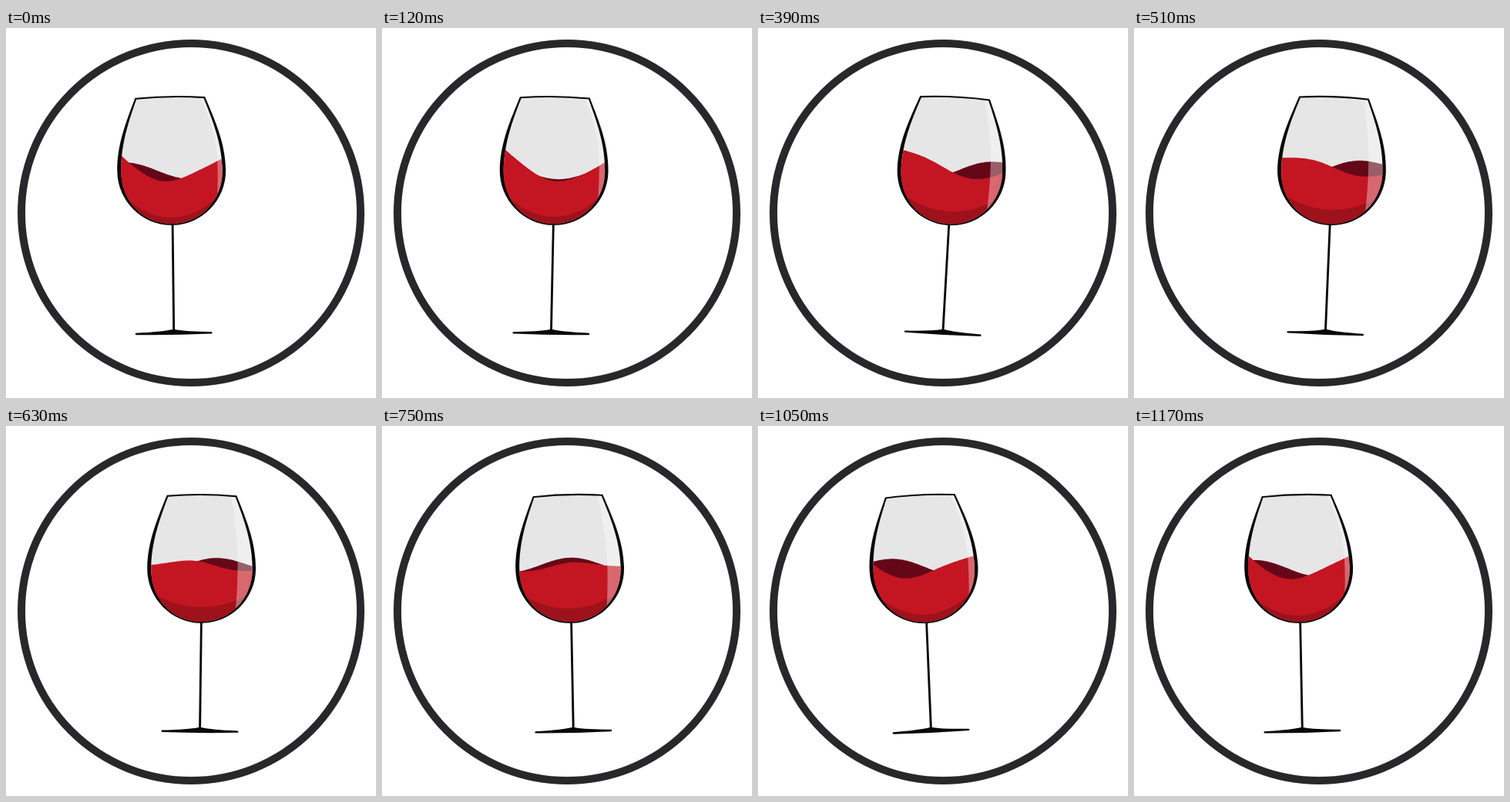
Write an HTML page with a canvas that moves like this. It is 480 px wide and 480 px high and loops after 1.2 s.

```html
<!DOCTYPE html>
<html>
<head>
<meta charset="utf-8">
<style>
  html, body { margin: 0; overflow: hidden; background: #fff; }
  canvas { display: block; }
</style>
</head>
<body>
<canvas id="stage" width="480" height="480"></canvas>
<script>
const ctx = document.getElementById('stage').getContext('2d');
const LOOP = 1200, STEP = 30, FOOT_Y = 396, RADIUS = 66;
const BLACK = '#080808';

// Glass parts, with x measured from the stem and y on the stage
const outer = new Path2D(`M-45.3,90 Q0,86 45.3,89.8 C57.5,120 70.8,150 70.8,185
  C70.8,224 39,255.8 0.5,255.8 C-38,255.8 -70,224 -70,185 C-70,150 -57,120 -45.3,90Z`);
const inner = new Path2D(`M-43.7,92 Q0,88.2 43.7,91.8 C54.5,120 66.4,150 66.4,186
  C66.4,223 38,254 0.5,254 C-38,254 -65,223 -65,186 C-65,150 -54,120 -43.7,92Z`);
const stem = new Path2D('M-0.7,254 L2.1,254 L1.5,393 L-1.4,393Z');
const foot = new Path2D(`M-49,395 Q-15,394 -1.5,391 L1.5,391 Q15,394 49,395
  Q51,396.2 49,397.4 Q0,398.8 -49,397.4 Q-51,396.2 -49,395Z`);

// -1 to 1 once per loop, highest at the peak time
const swing = (t, peak) => Math.cos(2 * Math.PI * (t - peak) / LOOP);

// The swirl runs left to right along the front of the wine and returns along the back; u is -1 to 1
const frontWave = (u, t) => 187.5 + 4 * u - 12.5 * u * u +
  (11.5 - 4 * u + 4 * u * u) * swing(t, 65 + 430 * u + 30 * Math.sin(Math.PI * u));
const backWave = (u, t) => 183.5 + (12.7 - 3.5 * u * u) * swing(t, 165 - 400 * u);

function fill(path, color) {
  ctx.fillStyle = color;
  ctx.fill(path);
}

function fillWave(wave, t, color) {
  const path = new Path2D();
  path.moveTo(-80, 270);
  for (let x = -80; x <= 80; x += 2) path.lineTo(x, wave(x / RADIUS, t));
  path.lineTo(80, 270);
  fill(path, color);
}

function draw(t) {
  const footX = 234.5 + 17 * swing(t, 630);
  const bowlX = 234.7 + 21.3 * swing(t, 535);
  const tilt = 3 * Math.PI / 180 * swing(t, 360);
  const near = swing(t, 600);
  const toGlass = () => {
    ctx.setTransform(1, 0, 0, 1, footX, FOOT_Y);
    ctx.rotate(tilt);
    ctx.translate(0, -FOOT_Y);
  };

  ctx.setTransform(1, 0, 0, 1, 0, 0);
  ctx.fillStyle = '#fff';
  ctx.fillRect(0, 0, 480, 480);
  ctx.beginPath();
  ctx.arc(240, 240, 220, 0, 2 * Math.PI);
  ctx.lineWidth = 10;
  ctx.strokeStyle = '#28282a';
  ctx.stroke();

  ctx.save();
  toGlass();
  for (const part of [foot, stem, outer]) fill(part, BLACK);
  fill(inner, '#e6e6e6');
  ctx.clip(inner);

  // The wine stays level while the glass tilts
  ctx.setTransform(1, 0, 0, 1, bowlX, 0);
  fillWave(backWave, t, '#640818');
  fillWave(frontWave, t, '#c41622');

  toGlass();
  const shadeY = 240.5 - 5.5 * near;
  fill(new Path2D(`M-62,218 Q0,${2 * shadeY - 218} 62,218 L80,260 L-80,260Z`),
    'rgba(0,0,0,0.2)');
  const shineX = 53.5 - 6.5 * near;
  fill(new Path2D(`M38,88 Q${shineX - 2},130 ${shineX},170
    Q${shineX + 1},205 ${shineX - 2},238 L80,238 L80,88Z`),
    'rgba(255,255,255,0.35)');
  ctx.restore();
}

function tick() {
  draw(Math.floor(performance.now() % LOOP / STEP) * STEP);
  requestAnimationFrame(tick);
}
tick();
</script>
</body>
</html>
```
